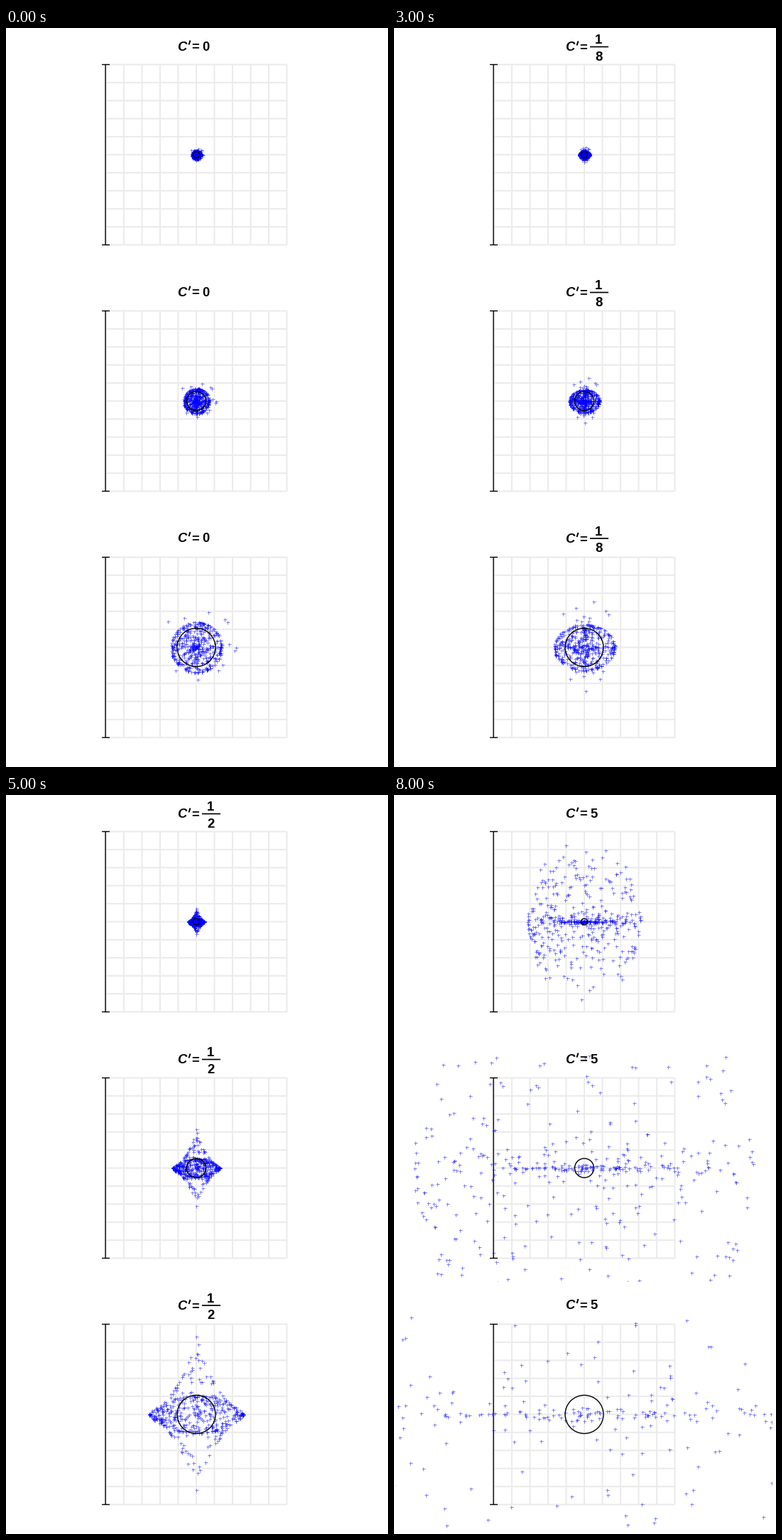
These frames come from a looping animation (538 by 1041 pixels, 9000 ms). A matplotlib script:

```python
import numpy as np
import matplotlib.pyplot as plt
from matplotlib.animation import FuncAnimation
from matplotlib.patches import Circle, Rectangle

W, H, DPI = 538, 1041, 64
PX = 72 / DPI  # points per pixel
CX = 267.5
ROWS = [(178, 1, 0), (525, 3, 346), (872, 6, 692.5)]  # centre y, zoom, title shift
STEPS = [(0, "0"), (1 / 20, "20"), (1 / 10, "10"), (1 / 8, "8"), (1 / 4, "4"),
         (1 / 2, "2"), (1, "1"), (2, "2"), (5, "5")]

plt.rcParams["font.family"] = "Liberation Sans"
plt.rcParams["font.weight"] = "bold"
fig = plt.figure(figsize=(W / DPI, H / DPI), dpi=DPI, facecolor="white")
ax = fig.add_axes([0, 0, 1, 1])
ax.set_xlim(-0.5, W - 0.5)
ax.set_ylim(H - 0.5, -0.5)
ax.axis("off")


def make_rays():
    """Polar pupil coordinates: a random disc plus a few marginal rays."""
    rng = np.random.default_rng(12)
    n = 470
    rho = 0.965 * rng.random(n) ** 0.68
    theta = 2 * np.pi * rng.random(n)
    edge = np.array([(17, -50), (2.5, 46), (56, 0), (40, -40), (44, -36), (-40, -37),
                     (-17, -42), (54, 5), (46, -5), (37, 25), (31, 33), (-29, 33)])
    ex, ey = edge.T
    rho_edge = ((np.hypot(ex, ey) + 39.8) / 92) ** (1 / 6)
    return np.append(rho, rho_edge), np.append(theta, np.arctan2(ey, ex))


RHO, THETA = make_rays()
BLUR = 92 * RHO ** 6 - 40 * np.tanh(RHO / 0.3)


def spots(c):
    """Ray hits for astigmatism c, at the largest zoom."""
    x = (BLUR - 106 * c * RHO) * np.cos(THETA)
    y = (BLUR + 125 * c * RHO ** 2.2) * np.sin(THETA)
    return x, y


def line(xs, ys, color="black", width=1.4, z=2):
    return ax.plot(xs, ys, color=color, lw=width * PX, zorder=z,
                   solid_capstyle="butt", snap=False)[0]


def label(x, y, s="", ha="center", **kw):
    return ax.text(x, y, s, fontsize=18.5 * PX, ha=ha, va="baseline", zorder=6, **kw)


class Panel:
    def __init__(self, cy, zoom, shift):
        self.cy, self.zoom, self.shift = cy, zoom, shift
        left, right, top, bottom = 140, 395, cy - 127, cy + 127
        for k in range(11):
            gx, gy = left + 25.5 * k, top + 25.4 * k
            line([gx, gx], [top, bottom], "#ebebeb", 2, 1)
            line([left, right], [gy, gy], "#ebebeb", 2, 1)
        line([left - 0.4] * 2, [top, bottom])
        for y in (top, bottom):
            line([134.5, 145.5], [y, y])

        self.dots = ax.plot([], [], "+", color="#0000ff", ms=5 * PX, mew=0.9 * PX,
                            alpha=0.55, zorder=3)[0]
        self.dots.set_clip_path(Rectangle((CX - 265.5, cy - 159), 529, 318,
                                          transform=ax.transData))
        ax.add_patch(Circle((CX, cy), 4.5 * zoom, fill=False, ec="black",
                            lw=1.4 * PX, zorder=4))

        self.name = label(241, 0, "C", "left", style="italic")
        self.prime = line([], [], width=2, z=6)
        self.equals = label(266.5, 0, "=")
        self.whole = label(281, shift + 31)
        self.num = label(288, shift + 22)
        self.den = label(288.5, shift + 45)
        self.bar = line([275.5, 301.5], [shift + 26] * 2, width=1.7, z=6)

    def show(self, c, digits):
        x, y = spots(c)
        k = self.zoom / 6
        self.dots.set_data(CX + k * x, self.cy + k * y)

        frac = 0 < c < 1
        base = self.shift + (32 if frac else 31)
        self.name.set_y(base)
        self.equals.set_y(base)
        self.prime.set_data([259, 257], [base - 14, base - 8])
        self.whole.set_text("" if frac else digits)
        self.num.set_text("1" if frac else "")
        self.den.set_text(digits if frac else "")
        self.bar.set_visible(frac)


panels = [Panel(*row) for row in ROWS]


def update(i):
    for p in panels:
        p.show(*STEPS[i])
    return []


anim = FuncAnimation(fig, update, frames=len(STEPS), interval=1000,
                     repeat=True, repeat_delay=0, blit=False)
plt.show()
```
